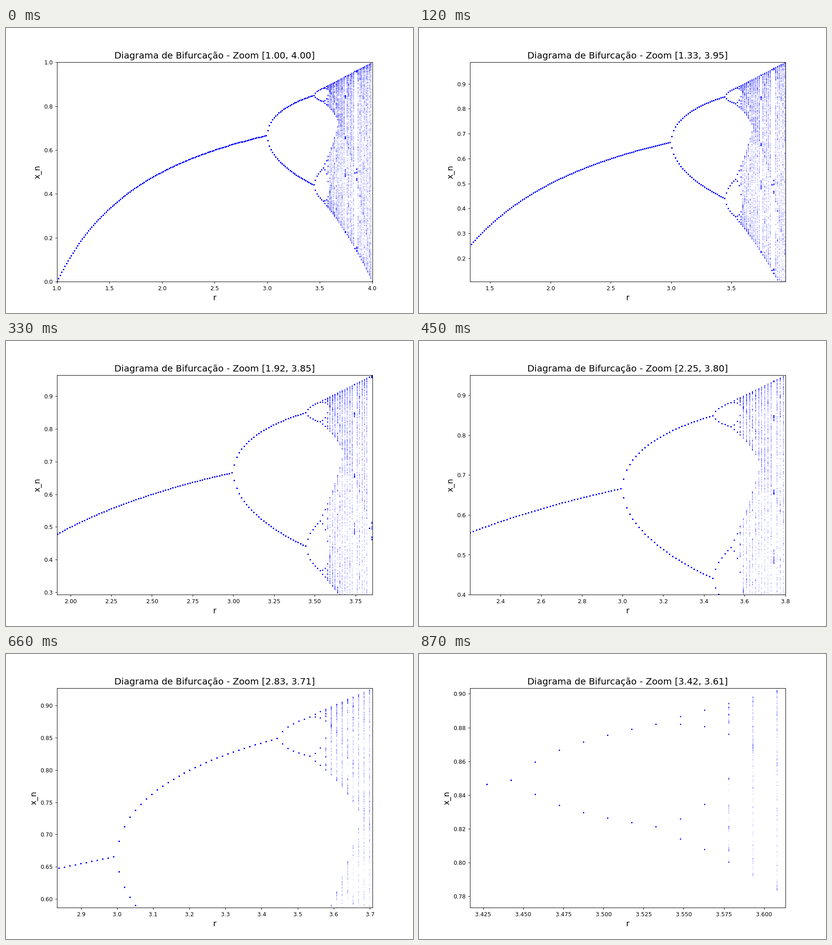
Recreate the animation shown at these times as a matplotlib script. Size 894 px wide and 626 px high, loop 0.9 s.

```python
import numpy as np
import matplotlib.pyplot as plt
from matplotlib.animation import FuncAnimation

W, H, DPI = 894, 626, 89.4
FRAMES, INTERVAL = 30, 30
N_R, SKIP, KEEP = 200, 600, 400

START = np.array([1.0, 4.0, 0.0, 1.0])   # r min, r max, x min, x max
END = np.array([3.5, 3.6, 0.8, 0.9])


def orbits():
    """Settled values of the logistic map for each r."""
    r = np.linspace(1, 4, N_R)
    x = np.full(N_R, 0.5)
    rows = []
    for n in range(SKIP + KEEP):
        x = r * x * (1 - x)
        if n >= SKIP:
            rows.append(x)
    return np.tile(r, KEEP), np.concatenate(rows)


plt.rcParams["font.family"] = "DejaVu Sans"
# the small margin keeps the pixel size from being floored one too low
fig, ax = plt.subplots(figsize=((W + 0.01) / DPI, (H + 0.01) / DPI), dpi=DPI)
ax.plot(*orbits(), "b.", markersize=0.7, alpha=0.3)
ax.set_xlabel("r", fontsize=14)
ax.set_ylabel("x_n", fontsize=14)
title = ax.set_title("", fontsize=16, pad=6.8)


def update(k):
    r0, r1, x0, x1 = START + (END - START) * k / FRAMES
    ax.set_xlim(r0, r1)
    ax.set_ylim(x0, x1)
    title.set_text(f"Diagrama de Bifurcação - Zoom [{r0:.2f}, {r1:.2f}]")
    return []


anim = FuncAnimation(fig, update, frames=FRAMES, init_func=lambda: update(0),
                     interval=INTERVAL, repeat=True, repeat_delay=0)
plt.show()
```
